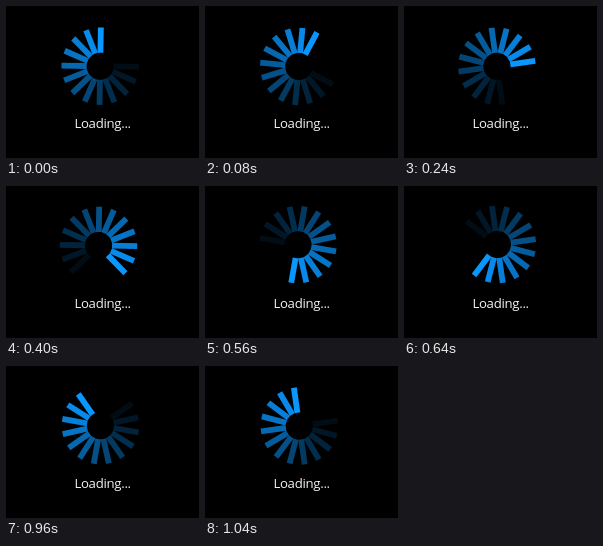
An HTML page for the animation above (1120 ms loop, 193 by 152 pixels).

```html
<!DOCTYPE html>
<html lang="en">
<head>
<meta charset="utf-8">
<title>Loading</title>
<style>
  html, body { margin: 0; width: 100%; height: 100%; overflow: hidden; background: #000; }
  svg { display: block; }
  text { font: 13.2px "Open Sans", "Noto Sans", sans-serif; letter-spacing: -0.3px; fill: #f4f4f4; }
</style>
</head>
<body>
<svg width="193" height="152" viewBox="0 0 193 152">
  <g id="wheel"></g>
  <text x="68.4" y="122">Loading...</text>
</svg>
<script>
  const BARS = 16, LIT_BARS = 13, STEPS = 14, STEP_MS = 80, STEP_DEG = 27, START_DEG = 1;
  const wheel = document.getElementById("wheel");

  // Faintest bar first, so that brighter bars overlap it near the hub.
  for (let i = LIT_BARS - 1; i >= 0; i--) {
    const light = 1 - i / LIT_BARS;
    const bar = document.createElementNS("http://www.w3.org/2000/svg", "rect");
    const attrs = {
      x: -2.9, y: -38.7, width: 5.8, height: 25.2,
      fill: `rgb(${8 * light}, ${150 * light}, ${255 * light})`,
      transform: `rotate(${-i * 360 / BARS})`
    };
    for (const name in attrs) bar.setAttribute(name, attrs[name]);
    wheel.append(bar);
  }

  // The hub sits slightly off the pivot, so the wheel wobbles as it turns.
  const start = performance.now();
  function draw(now) {
    const step = Math.floor(Math.max(0, now - start) / STEP_MS) % STEPS;
    const angle = START_DEG + step * STEP_DEG;
    wheel.setAttribute("transform", `translate(93.5 59.5) rotate(${angle}) translate(0.7 0.7)`);
    requestAnimationFrame(draw);
  }
  draw(start);
</script>
</body>
</html>
```
